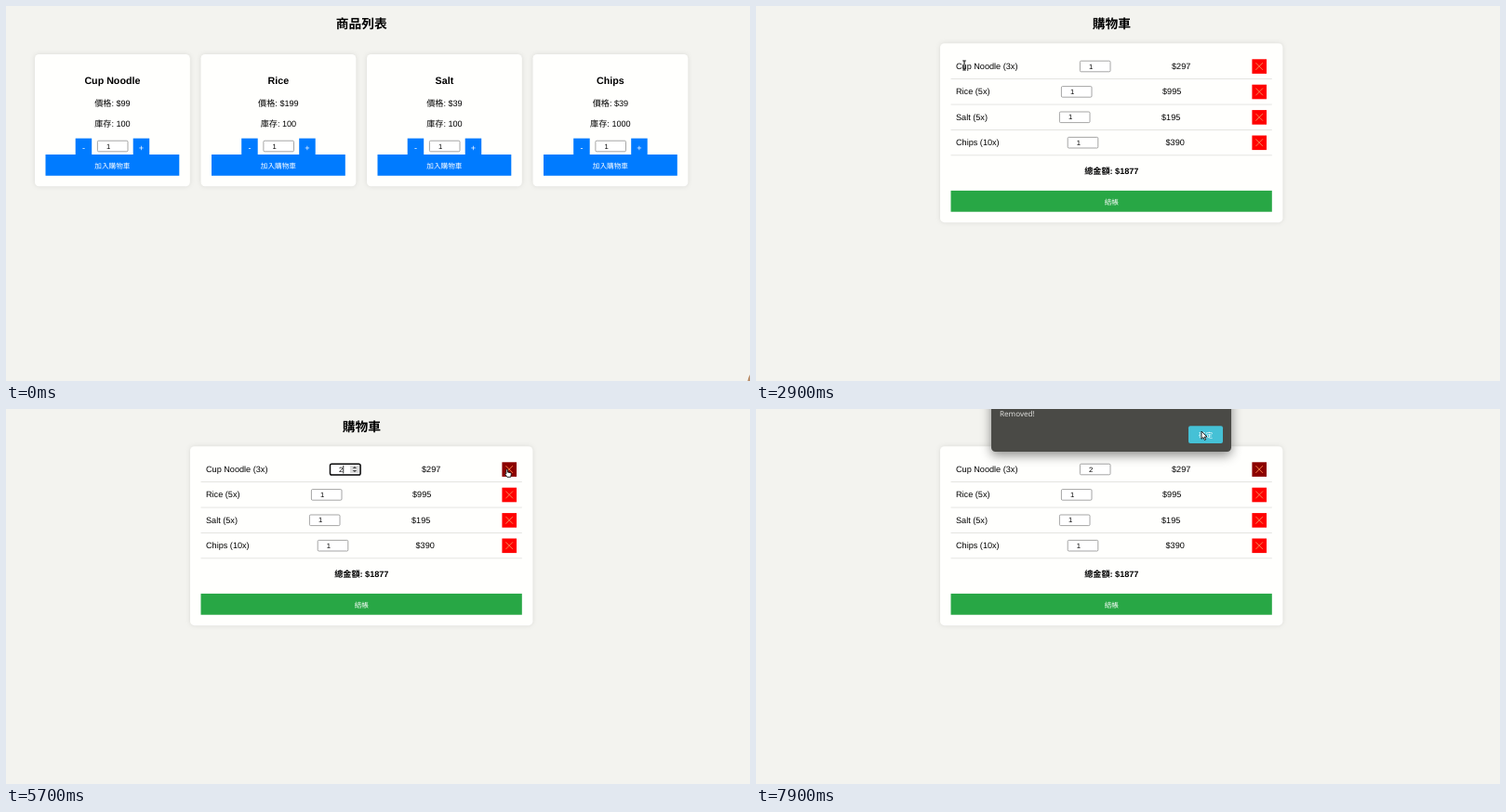
These frames come from a looping animation (800 px wide and 404 px high, 8000 ms). An HTML page:

```html
<!DOCTYPE html>
<html lang="zh-Hant">
<head>
<meta charset="utf-8">
<title>購物車</title>
<style>
  html, body { margin: 0; width: 100%; height: 100%; overflow: hidden; background: #f3f3ef; }
  svg { display: block; width: 800px; height: 404px; }
  text { font-family: 'Liberation Sans', 'Noto Sans CJK TC', 'Noto Sans CJK', sans-serif; font-size: 9.15px; text-rendering: geometricPrecision; }
  .mid { text-anchor: middle; }
  .bold { font-weight: bold; }
  .head { font-size: 13.73px; }
  .name { font-size: 10.7px; }
  .small { font-size: 7.63px; }
  .white { fill: #fff; }
  .card { fill: #fffffd; filter: drop-shadow(0 0 2.9px rgba(0,0,0,.1)); }
  .input { fill: #fff; stroke: #808080; stroke-width: .7; }
  .panel { fill: #4a4a46; filter: drop-shadow(0 4px 6px rgba(0,0,0,.45)); }
  .prompt { font-family: 'Noto Sans', sans-serif; font-size: 8.1px; fill: #dededb; }
  .pointer { fill: #fff; stroke: #111; stroke-width: .9; stroke-linejoin: round; }
</style>
</head>
<body>
<svg id="stage" viewBox="0 0 800 404"></svg>
<script>
const LOOP = 8000, STEP = 100;

const text = (x, y, str, cls = '', id = '') => `<text id="${id}" x="${x}" y="${y}" class="${cls}">${str}</text>`;
const rect = (x, y, w, h, attrs) => `<rect x="${x}" y="${y}" width="${w}" height="${h}" ${attrs}/>`;
const group = (id, body) => `<g id="${id}">${body}</g>`;
const input = (x, y, id = '') =>
  rect(x + .4, y + .4, 32.6, 11.6, 'rx="1.2" class="input"') + text(x + 12, y + 8.7, '1', 'mid small', id);

function product([name, price, stock], i) {
  const x = 31 + i * 178.5, mid = x + 83.4;
  return rect(x, 52, 166.8, 142.3, 'rx="4.6" class="card"')
    + text(mid, 84, name, 'mid bold name')
    + text(mid, 107.8, `價格: $${price}`, 'mid')
    + text(mid, 130.3, `庫存: ${stock}`, 'mid')
    + rect(x + 43.7, 142.6, 17.5, 18, 'fill="#007bff"') + text(x + 52.5, 156.3, '-', 'mid white')
    + input(x + 67, 144.8)
    + rect(x + 105.7, 142.6, 17.5, 18, 'fill="#007bff"') + text(x + 114.4, 156.3, '+', 'mid white')
    + rect(x + 11.5, 160, 143.8, 22.8, 'fill="#007bff"')
    + text(mid, 174.6, '加入購物車', 'mid small white');
}

function cartRow([label, inputX, price, priceX], i) {
  const y = 51.3 + i * 27.4;
  return text(215, y + 16.4, label)
    + input(inputX, y + 7.5, 'qty' + i)
    + text(priceX, y + 16.4, price)
    + rect(533.4, y + 6, 15.6, 15.6, `id="remove${i}" fill="#f00"`)
    + `<path id="cross${i}" d="M537.4 ${y + 9.8}l7.6 7.8m0-7.8l-7.6 7.8" stroke="#f0905c" stroke-width=".9"/>`
    + rect(209.5, y + 27, 345.3, .7, 'fill="#d9d9d6"');
}

const cart = (height, total, id) =>
  rect(198, 40.2, 368.4, height, 'rx="4.6" class="card"')
  + text(382.3, 24, '購物車', 'mid bold head')
  + text(382.3, height - 12.3, `總金額: $${total}`, 'mid bold')
  + rect(209.5, height + 5.9, 345.3, 22.8, `id="${id}" fill="#28a745"`)
  + text(382.3, height + 20.5, '結帳', 'mid small white');

const products = [['Cup Noodle', 99, 100], ['Rice', 199, 100], ['Salt', 39, 100], ['Chips', 39, 1000]];
const rows = [
  ['Cup Noodle (3x)', 348, '$297', 447], ['Rice (5x)', 328, '$995', 437],
  ['Salt (5x)', 326, '$195', 436], ['Chips (10x)', 334.8, '$390', 440.5],
];

document.getElementById('stage').innerHTML =
  group('shop', text(382.3, 24, '商品列表', 'mid bold head') + products.map(product).join('')
    + '<path d="M800 397q-2 3-2.6 7H800z" fill="#b98d6a"/>')
  + group('loading', cart(97, 0, 'payEmpty') + text(382.3, 62.2, '載入中...', 'mid'))
  + group('cart', cart(193, 1877, 'pay') + rows.map(cartRow).join(''))
  + group('spinner', rect(370, 61, 9.8, 8, 'fill="#dcdcdc"')
    + '<path d="M372.6 64l2.3-2 2.3 2zm0 2l2.3 2 2.3-2z" fill="#444"/>')
  + group('focus', rect(348.5, 59.2, 32.6, 11.8, 'rx="1.8" fill="none" stroke="#111" stroke-width="1.5"'))
  + group('caret', rect(362.4, 60.8, .8, 8.6, 'fill="#000"'))
  + group('dialog', rect(253, -30, 258, 76, 'rx="4.5" class="panel"')
    + text(262, 8.4, 'Removed!', 'prompt')
    + rect(465, 18.3, 37, 18.6, 'rx="2" id="confirm"')
    + text(483.6, 30.5, '確定', 'mid small white'))
  + group('pointer',
    '<path id="arrow" class="pointer" d="M.5.5v8.3l2-1.8 1.4 3 1.3-.6-1.4-2.9h2.7z"/>'
    + '<path id="beam" d="M-1.8-5h3.6m-1.8 0v10m-1.8 0h3.6" fill="none" stroke="#111" stroke-width="1.1"/>'
    + '<path id="hand" class="pointer" d="M.4 1q.8-1.2 1.6 0v2.6l3 .6q1 .3.8 1.4l-.6 3.2H1.3L-.9 5.6q0-1 1.3-.3z"/>');

const el = Object.fromEntries([...document.querySelectorAll('[id]')].map(e => [e.id, e]));
const show = (id, on) => { el[id].style.display = on ? '' : 'none'; };

// Pointer path: time, x, y
const path = [
  [1300, 768, 390], [1400, 610, 352], [1500, 420, 315], [1600, 329, 301], [1800, 329, 301],
  [1900, 321, 288], [2100, 286, 231], [2700, 224, 64], [2900, 224, 64], [3300, 403, 118],
  [3400, 403, 118], [4000, 375.5, 64.5], [4700, 375.5, 64.5], [5600, 537.5, 64.5],
  [7200, 537.5, 64.5], [7900, 478.5, 23.5],
];

function pointerAt(t) {
  const next = path.findIndex(p => p[0] > t);
  if (next < 0) return path.at(-1).slice(1);
  if (next === 0) return path[0].slice(1);
  const [t0, x0, y0] = path[next - 1], [t1, x1, y1] = path[next];
  const k = (t - t0) / (t1 - t0);
  return [x0 + (x1 - x0) * k, y0 + (y1 - y0) * k];
}

function render(t) {
  show('shop', t < 1000);
  show('loading', t >= 1000 && t < 1100);
  show('cart', t >= 1100);

  const [x, y] = pointerAt(t);
  const onText = x > 214 && x < 283 && y < 152 && Math.abs((y - 50.8) % 27.4 - 13.7) < 6;
  const onRemove = x > 533 && y > 57 && y < 73;
  const kind = onText ? 'beam' : onRemove ? 'hand' : 'arrow';
  show('pointer', t >= 1300);
  for (const k of ['arrow', 'beam', 'hand']) show(k, k === kind);
  el.pointer.setAttribute('transform', `translate(${x} ${y})`);

  const onPay = x > 209 && x < 555 && y > 199 && y < 222;
  el.pay.setAttribute('fill', onPay ? '#218838' : '#28a745');
  const removing = onRemove || t >= 6300;
  el.remove0.setAttribute('fill', removing ? '#8b0000' : '#f00');
  el.cross0.setAttribute('stroke', removing ? '#ff8a50' : '#f0905c');

  const focused = t >= 4500 && t < 6300;
  el.qty0.textContent = t >= 4500 ? 2 : 1;
  show('focus', focused);
  show('spinner', t >= 4000 && t < 6300);
  show('caret', focused && (t - 4500) % 1200 < 600);

  const opening = Math.min(1, Math.max(0, (t - 6600) / 300));
  const rest = 1 - opening;
  show('dialog', opening > 0);
  el.dialog.setAttribute('opacity', 1 - rest * rest * 1.06);
  el.dialog.setAttribute('transform',
    `translate(382 ${-11 * rest * rest}) scale(${1 + .016 * rest * rest} 1) translate(-382 0)`);
  const onConfirm = x > 465 && x < 502 && y > 18 && y < 37;
  el.confirm.setAttribute('fill', onConfirm ? '#45c1d6' : '#20bdd6');
}

function tick(now) {
  render(Math.floor(now % LOOP / STEP) * STEP);
  requestAnimationFrame(tick);
}
render(0);
requestAnimationFrame(tick);
</script>
</body>
</html>
```
